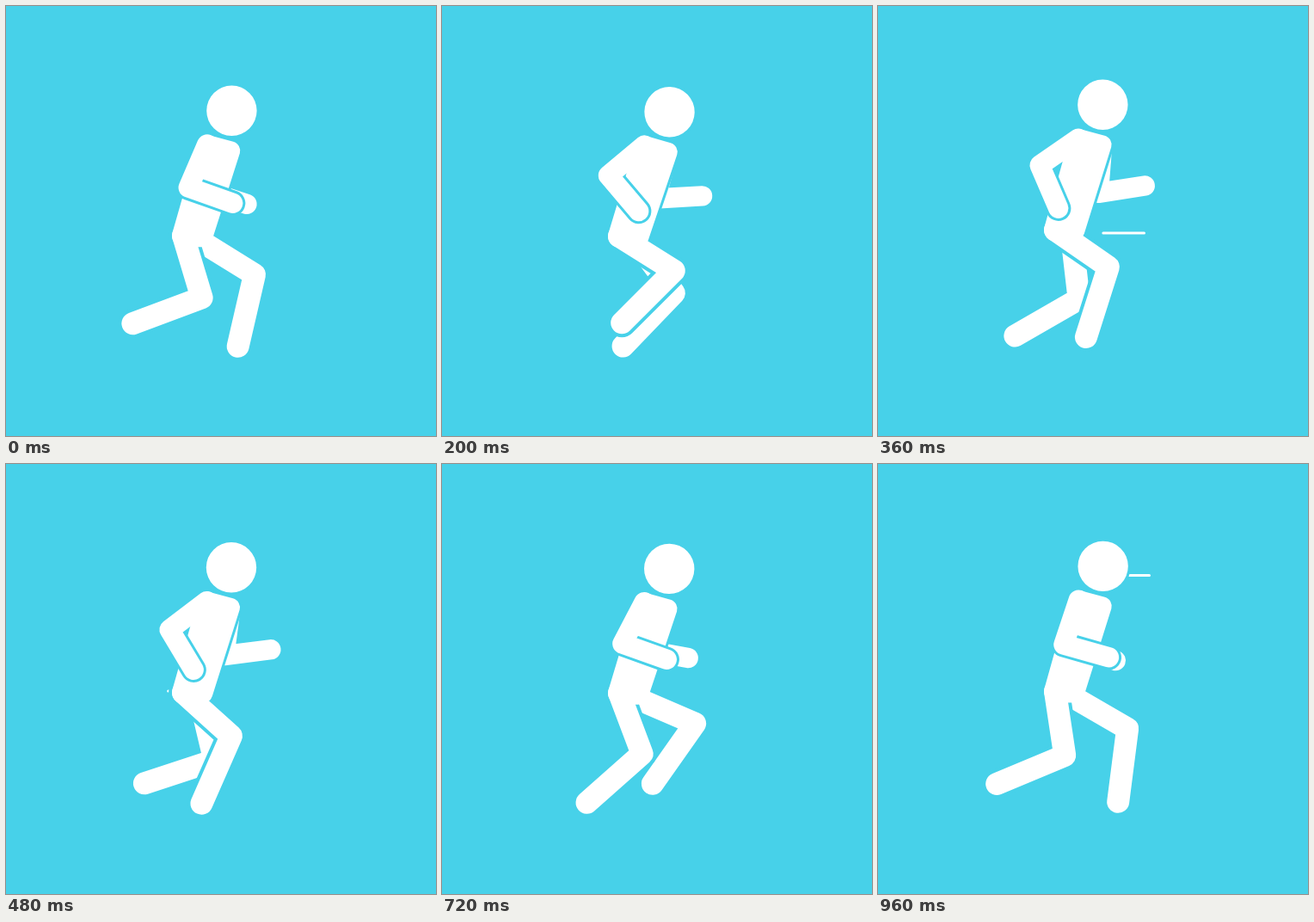
Animation of 500 by 500 pixels, one loop 1 s. Source, as an HTML page with a canvas:

```html
<!DOCTYPE html>
<html lang="en">
<head>
<meta charset="utf-8">
<title>Runner</title>
<style>
  html, body { margin: 0; width: 100%; height: 100%; overflow: hidden; background: #47d1e9; }
  canvas { display: block; width: 500px; height: 500px; }
</style>
</head>
<body>
<canvas id="stage" width="500" height="500"></canvas>
<script>
const ctx = document.getElementById('stage').getContext('2d');
const SKY = '#47d1e9', WHITE = '#fff', GAP = 3, LEG_GAP = 4;
const LOOP = 1000, STEP = 40, RAD = Math.PI / 180;
const ARM = { r: 11.7, upper: 54.5, lower: 54.5 };
const LEG = { r: 13, upper: 75.3, lower: 85.7 };

// Cosine of the given period that peaks at the given time
const swing = (t, period, peak) => Math.cos((t - peak) / period * 2 * Math.PI);

// One swing per stride plus a smaller one per step
const wave = (t, mean, amp, peak, amp2 = 0, peak2 = 0) =>
  mean + amp * swing(t, LOOP, peak) + amp2 * swing(t, LOOP / 2, peak2);

function stroke(points, width, color) {
  ctx.beginPath();
  points.forEach(p => ctx.lineTo(p[0], p[1]));
  ctx.lineWidth = width;
  ctx.strokeStyle = color;
  ctx.stroke();
}

// Angles in degrees, clockwise from the right
function limb(start, size, upper, lower) {
  const reach = (p, len, deg) =>
    [p[0] + len * Math.cos(deg * RAD), p[1] + len * Math.sin(deg * RAD)];
  const mid = reach(start, size.upper, upper);
  return [start, mid, reach(mid, size.lower, lower)];
}

function torsoPath() {
  const arc = (x, y, r, a, b) => ctx.arc(x, y, r, a * RAD, b * RAD);
  ctx.beginPath();
  arc(28, -106.2, 11, 195, 285.5);
  arc(55, -99, 11, -74.5, 18.7);
  arc(21.5, 0, 13, 18.7, 90);
  arc(0, 0, 13, 90, 195);
  ctx.closePath();
}

// A dash sliding left: the front sets off at t0, the back at t1
function dash(t, y, from, to, t0, t1, speed) {
  const at = start => Math.max(to, Math.min(from, from - speed * (t - start)));
  const left = at(t0), right = at(t1);
  if (right - left < 1) return;
  const inset = Math.min(1.5, (right - left) / 2 - 0.1);
  stroke([[left + inset, y], [right - inset, y]], 3, WHITE);
}

function draw(t) {
  const bob = -1.2 + 5.3 * swing(t, LOOP / 2, 105);
  const lean = (0.4 + 0.75 * swing(t, LOOP / 2, 150)) * RAD;
  const hip = [206, 267 + bob];
  const c = Math.cos(lean), s = Math.sin(lean);
  const onTorso = (x, y) => [hip[0] + x * c - y * s, hip[1] + x * s + y * c];
  const inTorso = fn => {
    ctx.save();
    ctx.translate(hip[0], hip[1]);
    ctx.rotate(lean);
    fn();
    ctx.restore();
  };
  const outline = () => {
    ctx.lineWidth = GAP * 2;
    ctx.strokeStyle = SKY;
    ctx.stroke();
  };

  const nearArm = limb(onTorso(27.5, -106.2), ARM,
    wave(t, 128, 20.7, 371, 3.4, 135), wave(t, 37.4, 27.5, 366, 2, 391));
  const farArm = limb(onTorso(55, -97.2), ARM,
    wave(t, 113.3, 19.1, 883), wave(t, 4.7, 16, 891, 2.6, 409));
  const nearLeg = limb(hip, LEG,
    wave(t, 55.3, 27.1, 844, 7.6, 406), wave(t, 134.8, 23.1, 942, 7.3, 90));
  const farLeg = limb([hip[0] + 19, hip[1] + 5.5], LEG,
    wave(t, 47.5, 29.5, 371, 8.8, 419), wave(t, 130.2, 31.8, 443, 7.8, 98));

  ctx.fillStyle = SKY;
  ctx.fillRect(0, 0, 500, 500);
  ctx.lineCap = ctx.lineJoin = 'round';

  dash(t, 264, 336, 113, 236, 319, 0.61);
  dash(t, 129.5, 398, 175, 755, 840, 0.675);

  stroke(farArm, ARM.r * 2, WHITE);
  inTorso(() => { torsoPath(); outline(); });
  stroke(farLeg, LEG.r * 2, WHITE);
  stroke(nearLeg, (LEG.r + LEG_GAP) * 2, SKY);
  stroke(nearLeg, LEG.r * 2, WHITE);

  ctx.fillStyle = WHITE;
  inTorso(() => {
    ctx.beginPath();
    ctx.arc(56, -145.5, 29.2, 0, 7);
    outline();
    ctx.fill();
    torsoPath();
    ctx.fill();
  });

  stroke(nearArm.slice(1), (ARM.r + GAP) * 2, SKY);
  stroke(nearArm, ARM.r * 2, WHITE);
}

const begin = performance.now();
function tick() {
  const t = (performance.now() - begin) % LOOP;
  draw(Math.floor(t / STEP) * STEP);
  requestAnimationFrame(tick);
}
tick();
</script>
</body>
</html>
```
